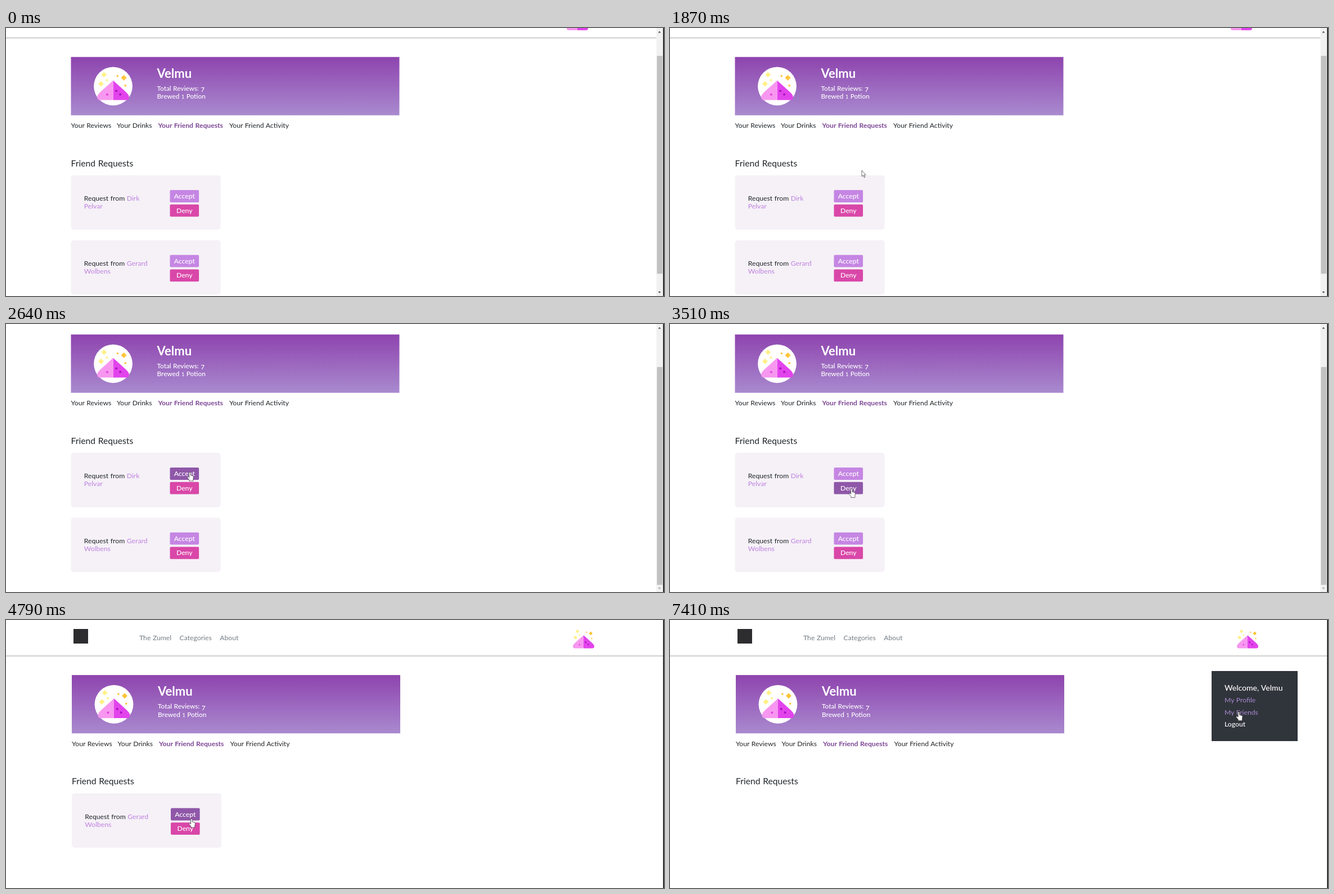
An HTML page that plays this animation: 1170 by 478 pixels, repeating every 8 s.

```html
<!DOCTYPE html>
<html lang="en">
<head>
<meta charset="utf-8">
<title>Friend requests</title>
<style>
  html, body { margin: 0; width: 100%; height: 100%; overflow: hidden; background: #fff; }
  svg { display: block; width: 100%; height: 100%; }
  text { font: 400 12.2px Lato, "Open Sans", sans-serif; word-spacing: .04em; fill: #212529; white-space: pre; }
  #nav { fill: #747b84; }
  .on { font-weight: 700; fill: #7c4695; }
  .title { font-size: 15.7px; }
  .name { font-size: 22px; font-weight: 700; fill: #fff; }
  .stat { font-size: 11.8px; font-weight: 500; fill: #fff; }
  .friend { fill: #c081e0; }
  .label { font-weight: 500; fill: #fff; text-anchor: middle; }
  .hello { font-size: 14px; font-weight: 500; fill: #fff; }
  .link { fill: #aa8bd2; }
</style>
</head>
<body>
<svg viewBox="0 0 1170 478">
  <defs>
    <linearGradient id="dusk" x2="0" y2="1">
      <stop stop-color="#8e44ae"/><stop offset="1" stop-color="#a98acf"/>
    </linearGradient>
    <!-- avatar, centred on its disc -->
    <g id="powder">
      <path id="slope" d="M0-10.2L22 9.7Q28.4 15.6 28.4 19.2 28.4 24.8 23 24.8H0Z" fill="#e244ec"/>
      <path d="M0-10.2L-22 9.7Q-28.4 15.6-28.4 19.2-28.4 24.8-23 24.8H0Z" fill="#f797f0"/>
      <circle cx="-10.6" cy="15" r="2" fill="#e044de"/>
      <g fill="#ad0ec0"><circle cx="5.7" cy="8.4" r="2"/><circle cx="12.6" cy="14.6" r="2"/></g>
      <path d="M-16.2-25.4l4.8 4.8-4.8 4.8-4.8-4.8zM-21.5-9.2l5 5-5 5-5-5zM-11-13.2l2.5 2.5-2.5 2.5-2.5-2.5z" fill="#fff08a"/>
      <path d="M19-20l5 5-5 5-5-5zM7.8-20.4l2.2 2.2-2.2 2.2-2.2-2.2zM21.7-3.2l2.2 2.2-2.2 2.2-2.2-2.2z" fill="#ffc43a"/>
    </g>
  </defs>

  <g id="page">
    <path d="M-5 64.2H1180" stroke="#b4b4b4" stroke-width="1.3"/>
    <rect x="120" y="16" width="26" height="26" fill="#2d2d2f"/>
    <text id="nav" x="237" y="36"></text>
    <use href="#powder" id="badge"/>
    <rect x="117" y="98.2" width="584" height="104" fill="url(#dusk)"/>
    <circle cx="192" cy="150.3" r="34.4" fill="#fff"/>
    <use href="#powder" x="192" y="150.3"/>
    <text class="name" x="270" y="135">Velmu</text>
    <text class="stat" x="270" y="158.3">Total Reviews: <tspan dy="2.2">7</tspan></text>
    <text class="stat" x="270" y="172.8">Brewed <tspan font-size="9.2">1</tspan> Potion</text>
    <text id="tabs" x="117" y="224.8"></text>
    <text class="title" x="117" y="293.2">Friend Requests</text>
    <g id="cards"></g>
  </g>

  <g id="menu"><rect x="963" y="91" width="153" height="125" fill="#30343b"/></g>

  <g id="bar">
    <rect x="1156.5" width="12" height="478" fill="#f1f1f1"/>
    <rect id="thumb" x="1157.5" width="9.8" height="388.5" fill="#c1c1c1"/>
    <path d="M1159.5 8.6h5l-2.5-3z" fill="#505050"/>
    <path id="down" d="M1159.5 470h5l-2.5 3z"/>
  </g>
  <rect x="1168.5" width="1.5" height="478" fill="#000"/>

  <g id="pointer" fill="#fff" stroke="#444" stroke-width=".8" stroke-linejoin="round">
    <path id="arrow" d="M0 0V10.8L2.5 8.6 4.3 12.7 5.9 12 4.1 8.1H7.2Z"/>
    <path id="hand" d="M-1.4 1.2Q0-.7 1.3 1.2V6L5 6.8Q6.7 7.2 6.5 9L5.8 13V16H-1.2V14L-4.6 10Q-5 8-3.2 8.2L-1.4 9.8Z"/>
  </g>
</svg>
<script>
const LOOP = 8000, STEP = 93;
const SCROLLED = 1960, DENIED = 4110, ACCEPTED = 5890;
const $ = id => document.getElementById(id);
const show = (el, on) => el.style.display = on ? '' : 'none';
const easeOut = p => 1 - (1 - p) ** 2;
const inside = (p, x, y, w, h) => p.x >= x && p.x <= x + w && p.y >= y && p.y <= y + h;

// pointer strokes: start time, number of steps, end point
const START = { x: 815, y: 0 };
const STROKES = [
  [1000, 3, 335, 233], [1770, 2, 341, 254], [2440, 3, 327, 264],
  [3040, 3, 323, 313], [3320, 3, 323, 293.5], [4300, 3, 327, 366],
  [4680, 2, 330, 354], [6070, 4, 1017, 80], [6560, 5, 1027, 30], [7130, 4, 1011.5, 163.5]
];

const CARD = { x: 117, y: 309.3, gap: 115.7 };
const BUTTON = { x: 176, y: 26.3, w: 51.6, h: 21.8, gap: 25.6, hover: '#8f57a8' };
const BUTTONS = [['Accept', '#c586e3'], ['Deny', '#d947a8']];
const buttonY = k => BUTTON.y + k * BUTTON.gap;

const flow = (items, gap) => items.map((s, i) => `<tspan dx="${i && gap}">${s}</tspan>`).join('');
$('nav').innerHTML = flow(['The Zumel', 'Categories', 'About'], 14.6);
$('tabs').innerHTML = flow(['Your Reviews', 'Your Drinks',
  '<tspan class="on">Your Friend Requests</tspan>', 'Your Friend Activity'], 11);

const menuY = i => 126.3 + i * 21.1;
$('menu').innerHTML += ['Welcome, Velmu', 'My Profile', 'My Friends', 'Logout'].map((s, i) =>
  `<text class="${['hello', 'link', 'link', 'label'][i]}" x="986" y="${menuY(i)}" style="text-anchor:start">${s}</text>`).join('');

const cards = [['Dirk', 'Pelvar'], ['Gerard', 'Wolbens']].map(([first, last]) => {
  const g = document.createElementNS('http://www.w3.org/2000/svg', 'g');
  g.innerHTML = `<rect width="266" height="97" rx="5" fill="#f5f1f7"/>
    <text x="23.3" y="45.3">Request from <tspan class="friend">${first}</tspan></text>
    <text class="friend" x="23.3" y="59.3">${last}</text>` +
    BUTTONS.map(([label], k) => `<rect class="btn" x="${BUTTON.x}" y="${buttonY(k)}" width="${BUTTON.w}" height="${BUTTON.h}" rx="2"/>
      <text class="label" x="${BUTTON.x + BUTTON.w / 2}" y="${buttonY(k) + 15}">${label}</text>`).join('');
  $('cards').append(g);
  return { g, buttons: [...g.querySelectorAll('.btn')] };
});

function layout(t) {
  const long = t < DENIED;
  return {
    long,
    dx: long ? -1.5 : 0,
    scroll: !long ? 0 : t < SCROLLED ? 46.5 : 79.5,
    open: long ? [0, 1] : t < ACCEPTED ? [1] : []
  };
}

// the pointer moves in steps; `moved` is the time of its latest step
function pointerAt(t) {
  let from = START, p = null;
  for (const [at, steps, x, y] of STROKES) {
    if (t < at) break;
    const k = Math.min(steps, Math.floor((t - at) / STEP) + 1);
    const e = easeOut(k / steps);
    p = { x: from.x + (x - from.x) * e, y: from.y + (y - from.y) * e, moved: at + (k - 1) * STEP };
    from = { x, y };
  }
  return p;
}

const overButton = (p, view, slot, k) => inside(p,
  CARD.x + view.dx + BUTTON.x, CARD.y + slot * CARD.gap - view.scroll + buttonY(k), BUTTON.w, BUTTON.h);
const overIcon = p => inside(p, 1008, 16, 38, 36);
const overLink = p => inside(p, 986, menuY(1) - 11, 60, 60);

function isHand(p) {
  const view = layout(p.moved);
  return overIcon(p) || overLink(p) ||
    view.open.some((_, slot) => BUTTONS.some((_, k) => overButton(p, view, slot, k)));
}

function draw(t) {
  const view = layout(t), p = pointerAt(t);
  $('page').setAttribute('transform', `translate(${view.dx} ${-view.scroll})`);
  $('badge').setAttribute('transform', `translate(${view.long ? 1017.5 : 1027} 34) scale(.67)`);

  show($('bar'), view.long);
  $('thumb').setAttribute('y', 11.7 + view.scroll * .818);
  $('down').setAttribute('fill', t < SCROLLED + STEP ? '#505050' : '#a3a3a3');

  cards.forEach(({ g, buttons }, i) => {
    const slot = view.open.indexOf(i);
    show(g, slot >= 0);
    g.setAttribute('transform', `translate(${CARD.x} ${CARD.y + slot * CARD.gap})`);
    buttons.forEach((el, k) =>
      el.setAttribute('fill', p && overButton(p, view, slot, k) ? BUTTON.hover : BUTTONS[k][1]));
  });

  // the menu has an unseen margin above it that also keeps it open
  show($('menu'), p && !view.long && (overIcon(p) || inside(p, 963, 78, 153, 138)));

  show($('pointer'), p);
  if (!p) return;
  const hand = isHand(p);
  $('pointer').setAttribute('transform', `translate(${p.x} ${p.y})`);
  show($('hand'), hand);
  show($('arrow'), !hand);
}

function tick() {
  draw(performance.now() % LOOP);
  requestAnimationFrame(tick);
}
tick();
</script>
</body>
</html>
```
